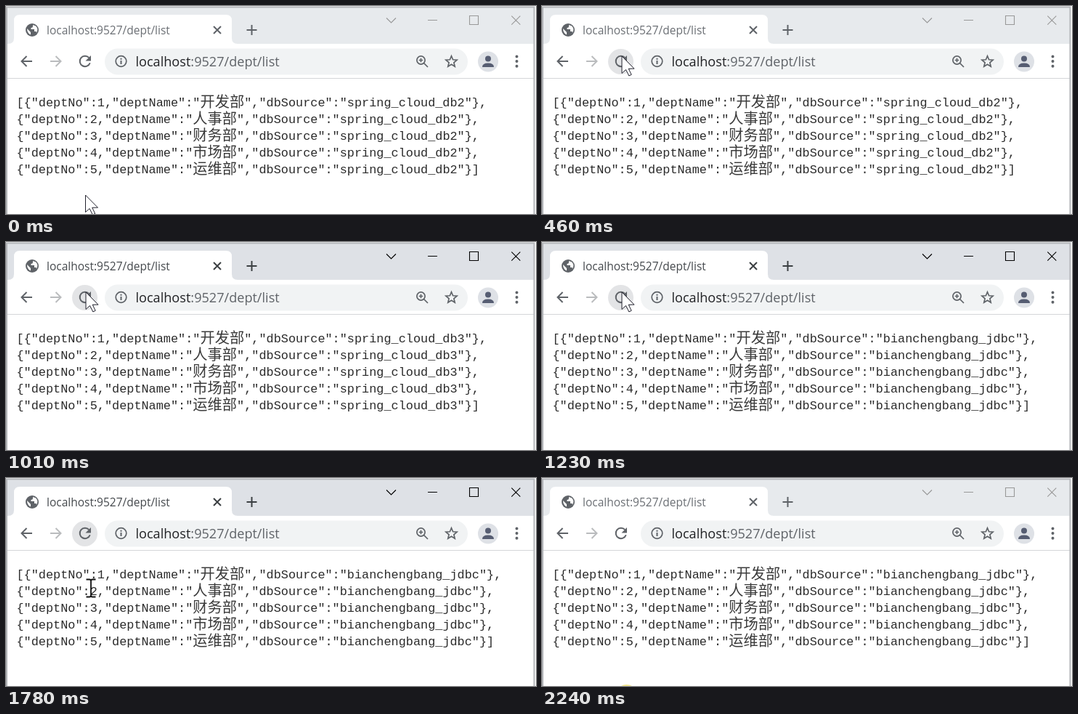
These frames come from a looping animation (730x286 px, 2380 ms). An HTML page:

```html
<!DOCTYPE html>
<html lang="en">
<head>
<meta charset="utf-8">
<title>Department list</title>
<style>
  html, body { margin: 0; width: 100%; height: 100%; overflow: hidden; background: #fff; }
  svg { display: block; }
  .ui { font-family: "Open Sans", "Noto Sans", sans-serif; }
  .json { font: 16.88px "Liberation Mono", monospace; fill: #2b2b2b; white-space: pre; }
  .cjk { font: 300 20.26px "Noto Sans CJK SC", "Noto Sans CJK", sans-serif; fill: #3a3a3a; }
  .line { fill: none; stroke: #5f6368; stroke-width: 2; }
  .thin { stroke-width: 1.7; }
</style>
</head>
<body>
<svg width="730" height="286" viewBox="0 0 730 286">
  <rect width="730" height="286" fill="#fff"/>
  <rect id="strip" x="2" y="2" width="725" height="50"/>
  <path d="M3 52Q11 52 11 44V20Q11 12 19 12H303Q311 12 311 20V44Q311 52 319 52Z" fill="#fff"/>

  <!-- tab -->
  <circle cx="36" cy="33" r="9" fill="#5f6368"/>
  <path d="M29 31L34 36V39.5Q29 37.5 29 31ZM37 26V28Q37 30 34.5 30V32H39V35H41.5L42 37Q45 31 41 27.5Z" fill="#fff"/>
  <text id="tabText" class="ui" x="56" y="39" font-size="15.5">localhost:9527/dept/list</text>
  <path id="tabIcons" class="line" d="M286 28L296 38M296 28L286 38M331.5 33H345.5M338.5 26V40"/>
  <path id="winIcons" fill="none" stroke-width="1.1"
    d="M524 16.5L530.5 23L537 16.5M581 19.5H594M638.5 13.5H650.5V25.5H638.5ZM696.3 13.7L708.3 25.7M708.3 13.7L696.3 25.7"/>

  <!-- toolbar -->
  <path d="M2 99.5H727" stroke="#d4d6d9"/>
  <path class="line" d="M36 76H22M28.5 69L21.5 76L28.5 83"/>
  <path class="line" style="stroke:#babcbe" d="M61 76H75M68.5 69L75.5 76L68.5 83"/>
  <circle id="hover" cx="108.5" cy="76.5" r="17.5"/>
  <path class="line" d="M114.3 71.2A7.2 7.2 0 1 0 115.7 78.2"/>
  <path d="M117 68V75.5H109.5Z" fill="#5f6368"/>
  <rect x="136" y="58.5" width="500" height="36" rx="18" fill="#f1f3f4"/>
  <circle class="line thin" cx="158.5" cy="76" r="7.3"/>
  <path class="line" d="M158.5 75V80M158.5 71.8V73.7"/>
  <text class="ui" x="178.5" y="82.5" font-size="18.1" fill="#5f6368"><tspan fill="#202124">localhost</tspan>:9527/dept/list</text>
  <circle class="line thin" cx="571.5" cy="74.5" r="5.6"/>
  <path class="line thin" d="M575.5 78.5L581 84M568.7 74.5H574.3M571.5 71.7V77.3"/>
  <path id="star" class="line thin"/>
  <circle cx="664" cy="76.5" r="14" fill="#dee1e6"/>
  <circle cx="664" cy="72.5" r="4" fill="#565d72"/>
  <path d="M656 84Q656 78.5 664 78.5T672 84Z" fill="#565d72"/>
  <path d="M703.5 69.5V83" stroke="#5f6368" stroke-width="4" stroke-linecap="round" stroke-dasharray="0 6.6"/>

  <g id="rows"></g>
  <circle id="glow" cx="116.5" cy="299" r="15" fill="#f2e68c"/>
  <path id="arrow" d="M0 0V23.5L5.6 18.5L9.8 27L13.2 25.4L9.2 17.2H17Z" fill="#fff" stroke="#22222e"/>
  <path id="beam" d="M-6.5 -12H-2Q0 -12 0 -10Q0 -12 2 -12H6.5M0 -11V11M-6.5 12H-2Q0 12 0 10Q0 12 2 12H6.5" fill="none" stroke="#111" stroke-width="1.8"/>
  <path d="M1 290V1.5H727.5V290" fill="none" stroke="#b4b6ba" stroke-width="2"/>
</svg>
<script>
const LOOP = 2380;
const el = id => document.getElementById(id);
const set = (id, name, value) => el(id).setAttribute(name, value);
const show = (id, on) => set(id, "visibility", on ? "visible" : "hidden");

// The screen was sampled at these moments.
const ticks = [0, 70, 150, 230, 300, 380, 450, 530, 610, 700, 760, 840, 920, 1010, 1090,
  1150, 1230, 1310, 1390, 1470, 1540, 1620, 1700, 1780, 1850, 1930, 2010, 2080, 2160, 2240];

// Pointer path: time, x, y
const path = [
  [0, 109.5, 260], [150, 99, 155], [230, 97, 115], [300, 102, 88], [380, 109, 71],
  [450, 110, 69], [1620, 110, 69], [1700, 114, 103], [1780, 117, 151.5],
  [1930, 117, 208], [2010, 115, 231], [2240, 115, 231]
];

// Data source answering from each time on
const sources = [
  [0, "spring_cloud_db2"], [840, "spring_cloud_db3"], [1090, "bianchengbang_jdbc"],
  [1310, "spring_cloud_db2"], [1540, "spring_cloud_db3"], [1700, "bianchengbang_jdbc"]
];

const lastBefore = (list, t, key) => list.filter(item => key(item) <= t).pop();

function pointerAt(t) {
  const i = path.findIndex(p => p[0] > t);
  if (i < 1) return path[path.length - 1].slice(1);
  const [t0, x0, y0] = path[i - 1], [t1, x1, y1] = path[i];
  const k = (t - t0) / (t1 - t0);
  return [x0 + (x1 - x0) * k, y0 + (y1 - y0) * k];
}

const departments = ["开发部", "人事部", "财务部", "市场部", "运维部"];
const rowEnds = departments.map((name, i) => {
  const row = document.createElementNS("http://www.w3.org/2000/svg", "text");
  row.setAttribute("class", "json");
  row.setAttribute("x", 14.5);
  row.setAttribute("y", 137.5 + 23 * i);
  row.innerHTML = `${i ? "" : "["}{"deptNo":${i + 1},"deptName":"` +
    `<tspan class="cjk" dy="1">${name}</tspan><tspan dy="-1"></tspan>`;
  el("rows").append(row);
  return row.lastChild;
});

const starPoints = Array.from({ length: 10 }, (_, i) => {
  const a = (i / 5 - 0.5) * Math.PI, r = i % 2 ? 3.6 : 8;
  return [613.5 + r * Math.cos(a), 76.7 + r * Math.sin(a)].map(v => v.toFixed(1));
});
set("star", "d", "M" + starPoints.join("L") + "Z");

function draw(time) {
  const t = lastBefore(ticks, time % LOOP, v => v);
  const active = t >= 610 && t < 2240;
  set("strip", "fill", active ? "#dee1e6" : "#e7eaed");
  set("tabText", "fill", active ? "#45494d" : "#6b6f74");
  el("tabIcons").style.stroke = active ? "#3c4043" : "#5f6368";
  set("winIcons", "stroke", active ? "#000" : "#999");

  show("hover", t >= 300 && t < 1850);
  set("hover", "fill", t >= 610 && t < 760 ? "#d5d7da" : "#e3e4e6");

  const source = lastBefore(sources, t, s => s[0])[1];
  rowEnds.forEach((end, i) => {
    const text = `","dbSource":"${source}"}${i < 4 ? "," : "]"}`;
    if (end.textContent !== text) end.textContent = text;
  });

  const [x, y] = pointerAt(t);
  const beam = t >= 1780 && t < 2010;
  for (const id of ["arrow", "beam"]) set(id, "transform", `translate(${x} ${y})`);
  show("beam", beam);
  show("arrow", !beam && t < 2240);
  show("glow", t >= 2240);
}

const start = performance.now();
function loop() {
  draw(performance.now() - start);
  requestAnimationFrame(loop);
}
loop();
</script>
</body>
</html>
```
